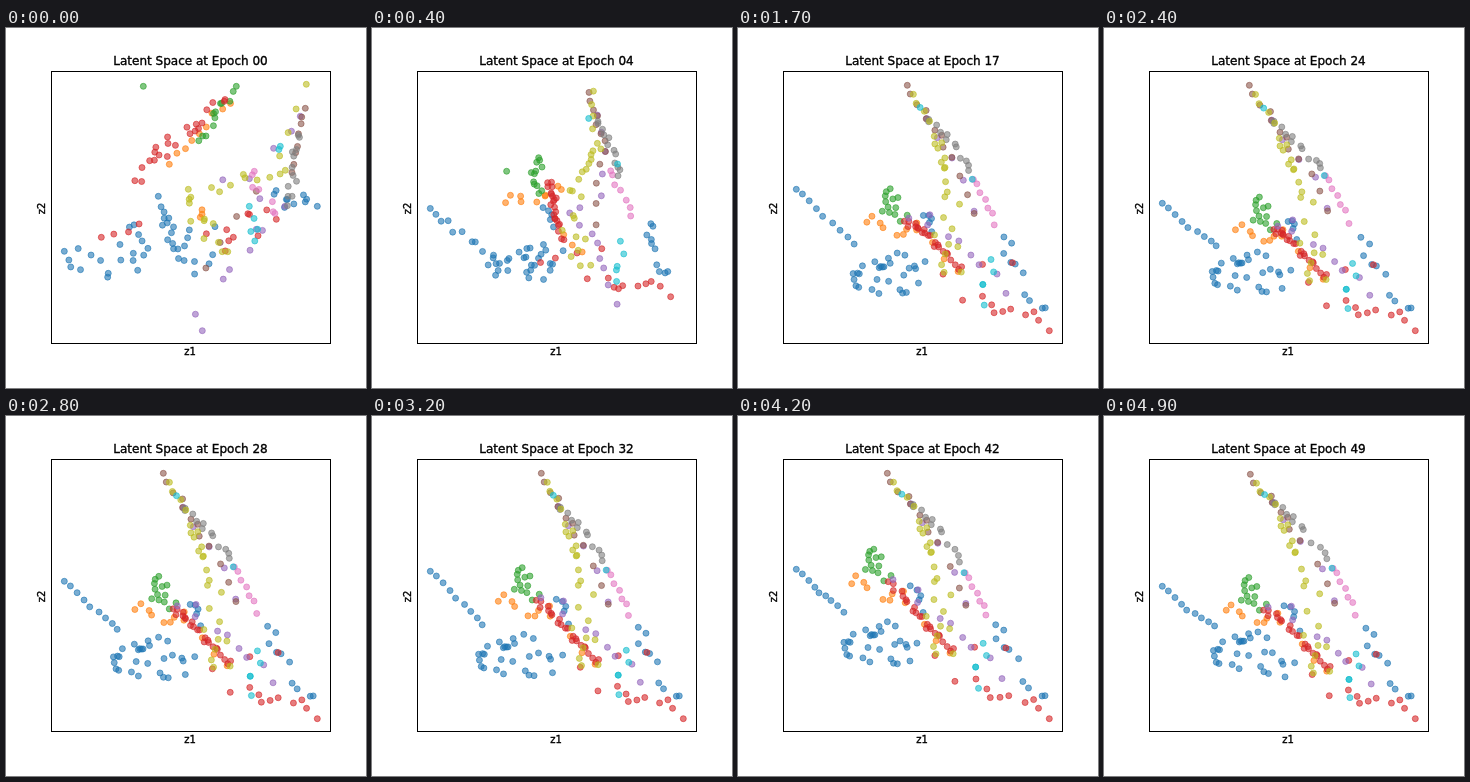
An HTML page that plays this animation: 360x360 px, repeating every 5 s.

```html
<!DOCTYPE html>
<html lang="en">
<head>
<meta charset="utf-8">
<title>Latent space</title>
<style>
  html, body { margin: 0; width: 100%; height: 100%; overflow: hidden; background: #fff; }
  svg { display: block; width: 100%; height: 100%; }
  text { font: 10px "DejaVu Sans", sans-serif; text-anchor: middle; stroke: #000; stroke-width: .35; }
  #title { font-size: 12px; }
  circle { fill-opacity: .6; stroke-opacity: .6; stroke-width: 1; }
</style>
</head>
<body>
<svg viewBox="0 0 360 360">
  <g id="dots"></g>
  <rect x="45.5" y="43.5" width="279" height="272" fill="none" stroke="#000"/>
  <text id="title" x="184.5" y="37.2">Latent Space at Epoch 00</text>
  <text x="184" y="327">z1</text>
  <text transform="translate(38.5 180.5) rotate(-90)">z2</text>
</svg>
<script>
const EPOCHS = 50, STEP = 100;
const KEYS = [9, 17, 24, 32, 42, 49], REST = 3;

const layer = document.getElementById('dots');
const title = document.getElementById('title');
const dots = [], marks = [];

let seed = 7;
function random() {
  seed = (seed * 16807) % 2147483647;
  return seed / 2147483647;
}

// Point at t along a strip, scattered within its spread
function place([x0, y0, x1, y1, spread], t) {
  const angle = random() * 2 * Math.PI;
  const r = t ? spread * Math.sqrt(random()) : 0;
  return [x0 + (x1 - x0) * t + r * Math.cos(angle), y0 + (y1 - y0) * t + r * Math.sin(angle)];
}

// n dots going from an untrained strip to a trained one
function swarm(color, n, raw, trained) {
  for (let i = 0; i < n; i++) {
    const t = i / Math.max(n - 1, 1);
    const el = document.createElementNS('http://www.w3.org/2000/svg', 'circle');
    el.setAttribute('r', 3);
    el.setAttribute('fill', color);
    el.setAttribute('stroke', color);
    layer.append(el);
    dots.push({ el, start: place(raw, t), end: place(trained, t) });
  }
}

// Landmark with its dx,dy at every key epoch except the rest pose
function mark(x, y, ...shifts) {
  const path = [];
  for (let i = 0; i < shifts.length; i += 2) path.push([shifts[i], shifts[i + 1]]);
  while (path.length < KEYS.length) path.splice(REST, 0, [0, 0]);
  marks.push({ x, y, path });
}

const blue = '#1f77b4', orange = '#ff7f0e', green = '#2ca02c', red = '#d62728', purple = '#9467bd',
  brown = '#8c564b', pink = '#e377c2', grey = '#7f7f7f', olive = '#bcbd22', cyan = '#17becf';

swarm(blue, 9, [58, 223, 107, 243, 14], [58, 155, 109, 210, 3]);
swarm(blue, 29, [127, 225, 188, 217, 30], [112, 238, 164, 240, 27]);
swarm(blue, 5, [152, 168, 163, 193, 5], [184, 183, 195, 204, 7]);
swarm(blue, 10, [311, 178, 266, 170, 9], [266, 211, 300, 284, 10]);
swarm(orange, 9, [163, 136, 222, 72, 4], [126, 185, 181, 200, 9]);
swarm(orange, 3, [194, 189, 197, 182, 2], [198, 220, 222, 248, 3]);
swarm(green, 12, [230, 58, 192, 114, 5], [146, 154, 160, 182, 9]);
swarm(green, 1, [137, 58, 137, 58, 0], [142, 173, 142, 173, 0]);
swarm(red, 22, [218, 73, 124, 150, 10], [164, 184, 222, 245, 5]);
swarm(red, 4, [95, 209, 131, 195, 9], [208, 251, 270, 233, 7]);
swarm(red, 10, [270, 191, 199, 215, 17], [311, 303, 235, 268, 12]);
swarm(purple, 5, [294, 88, 226, 149, 18], [186, 90, 236, 180, 6]);
swarm(purple, 9, [196, 303, 275, 165, 18], [268, 266, 174, 180, 9]);
swarm(brown, 8, [299, 80, 287, 143, 3], [169, 57, 203, 118, 4]);
swarm(brown, 4, [250, 163, 200, 237, 5], [211, 129, 235, 187, 3]);
swarm(pink, 7, [248, 143, 268, 190, 9], [235, 154, 256, 197, 3]);
swarm(grey, 12, [292, 107, 284, 180, 6], [188, 91, 231, 142, 5]);
swarm(olive, 4, [300, 56, 276, 127, 3], [175, 66, 187, 93, 2]);
swarm(olive, 9, [279, 142, 205, 160, 8], [193, 108, 202, 150, 7]);
swarm(olive, 12, [182, 161, 215, 225, 13], [206, 169, 215, 255, 15]);
swarm(cyan, 2, [274, 118, 273, 122, 1], [181, 79, 234, 153, 1]);
swarm(cyan, 5, [243, 178, 250, 215, 14], [254, 234, 245, 275, 7]);

mark(58, 155, 0, 6, 0, 6, 0, 20, 0, -2, 0, 15);
mark(138, 238, 12, 2, 10, 8, 2, 4, 1, -12, 4, -6);
mark(169, 57, 11, 0, 0, 0, -24, 0, -20, 0, -23, 1);
mark(198, 110, 8, -5, 3, 0, -18, 2, -12, -3, -17, -6);
mark(243, 165, -1, -12, 0, -3, -14, -7, -8, 3, -6, -2);
mark(149, 172, -9, 8, 2, 10, 7, 19, -15, -20, -5, 11);
mark(200, 230, -8, -6, -4, -6, -4, 3, -12, -12, 0, 8);
mark(311, 303, ...KEYS.slice(1).flatMap(() => [0, 0]));

const mix = (a, b, t) => a.map((v, i) => v + (b[i] - v) * t);
const clamp = (v, lo, hi) => Math.min(Math.max(v, lo), hi);

// Nearby landmarks drag a point along
function warp([x, y], shifts) {
  let sx = 0, sy = 0, sum = 0;
  marks.forEach((m, i) => {
    const w = ((x - m.x) ** 2 + (y - m.y) ** 2 + 60) ** -1.5;
    sx += w * shifts[i][0];
    sy += w * shifts[i][1];
    sum += w;
  });
  return [x + sx / sum, y + sy / sum];
}

function draw(epoch) {
  const e = Math.max(epoch, KEYS[0]);
  const k = Math.min(KEYS.filter(v => v <= e).length, KEYS.length - 1) - 1;
  const t = (e - KEYS[k]) / (KEYS[k + 1] - KEYS[k]);
  const shifts = marks.map(m => mix(m.path[k], m.path[k + 1], t));
  const learned = 1 - (1 - Math.min(epoch / KEYS[0], 1)) ** 2;
  for (const { el, start, end } of dots) {
    const [x, y] = mix(start, warp(end, shifts), learned);
    el.setAttribute('cx', clamp(x + .3, 57.7, 311.3).toFixed(2));
    el.setAttribute('cy', clamp(y + .3, 55.6, 302.7).toFixed(2));
  }
  title.textContent = 'Latent Space at Epoch ' + String(epoch).padStart(2, '0');
}

let shown = 0;
const begin = performance.now();
function tick() {
  const epoch = Math.floor((performance.now() - begin) / STEP) % EPOCHS;
  if (epoch !== shown) draw(shown = epoch);
  requestAnimationFrame(tick);
}
draw(0);
requestAnimationFrame(tick);
</script>
</body>
</html>
```
